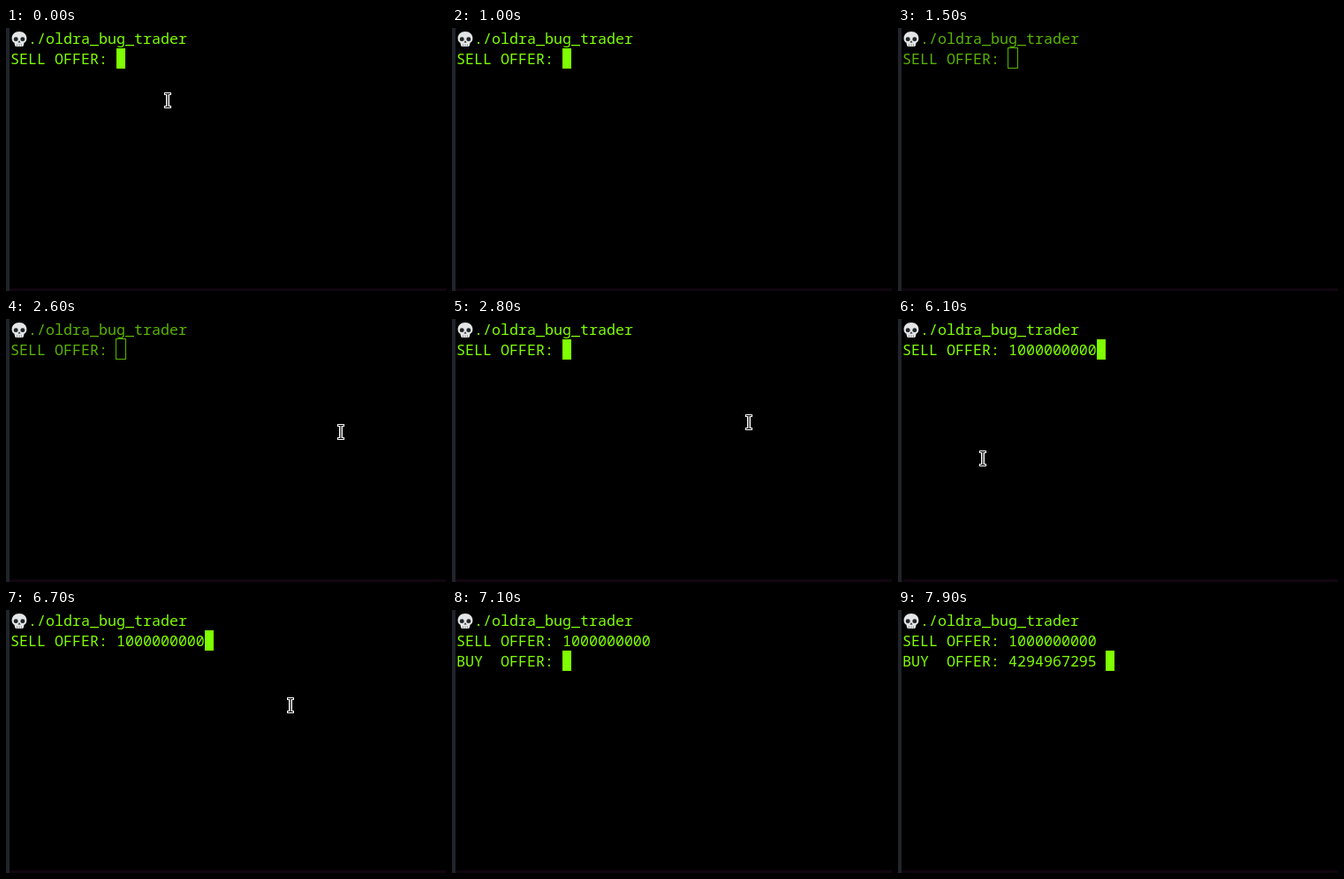
Recreate the animation shown at these times as an HTML page. Size 498 by 298 pixels, loop 8 s.

```html
<!DOCTYPE html>
<html lang="en">
<head>
<meta charset="utf-8">
<title>Terminal</title>
<style>
  html, body { margin: 0; width: 100%; height: 100%; overflow: hidden; background: #000; }
  svg { display: block; }
  text { font: 16.667px "Noto Sans Mono", monospace; white-space: pre; }
  #terminal { color: #7fff00; }
  #terminal.inactive { color: #59b300; }
  #terminal text { fill: currentColor; }
  #caret { fill: currentColor; stroke: none; }
  .inactive #caret { fill: none; stroke: currentColor; }
</style>
</head>
<body>
<svg width="498" height="298" viewBox="0 0 498 298">
  <rect width="498" height="298"/>
  <rect y="295" width="498" height="3" fill="#10060f"/>
  <rect width="4" height="298" fill="#20242b"/>

  <g id="skull">
    <path d="M15 4C10 4 6.600 7.300 6.600 11.700C6.600 14 7.500 15.800 9.500 16.700L10 19.500Q10.300 21 12 21H18Q19.700 21 20 19.500L20.500 16.700C22.500 15.800 23.400 14 23.400 11.700C23.400 7.300 20 4 15 4Z" fill="#e3e5e6"/>
    <g fill="#20262a">
      <ellipse cx="11.200" cy="12.700" rx="2.500" ry="2.400"/>
      <ellipse cx="18.800" cy="12.700" rx="2.500" ry="2.400"/>
      <path d="M15 14.300L16.500 16.600H13.500Z"/>
    </g>
    <path d="M12.500 18.500V20.500M15 18.500V20.500M17.500 18.500V20.500" stroke="#6d7478" stroke-width=".8"/>
  </g>

  <g id="terminal">
    <text x="25" y="18">./oldra_bug_trader</text>
    <text id="sell" x="5" y="41"></text>
    <text id="buy" x="5" y="64"></text>
    <rect id="caret"/>
  </g>

  <g id="pointer">
    <path d="M-4-9H4V-6H2V6H4V9H-4V6H-2V-6H-4Z" fill="#fff"/>
    <path d="M-3-7.500H3M-3 7.500H3M0-7.500V7.500" stroke="#000" stroke-width="1.200"/>
  </g>
</svg>
<script>
const LOOP = 8000, CELL = 10, ROW = 23, LEFT = 5;
const [terminal, sell, buy, caret, pointer] =
  ["terminal", "sell", "buy", "caret", "pointer"].map(id => document.getElementById(id));

// [start ms, x, y]; no position means the pointer is outside the window
const pointerSteps = [
  [0, 183, 82], [800, 423, 140], [1000],
  [2600, 379, 128], [2700, 348, 120], [2800, 336, 117], [3600, 409, 113], [3700],
  [6100, 96, 158], [6200, 15, 163], [6300, 130, 140], [6400, 271, 115],
  [6700, 322, 108], [6800, 325, 107], [7000]
];
const sellSteps = [[0, "SELL OFFER: "], [3300, "SELL OFFER: 1000000000"]];
const buySteps = [[0, ""], [7100, "BUY  OFFER: "], [7900, "BUY  OFFER: 4294967295 "]];

const at = (steps, time) => steps.findLast(([start]) => start <= time).slice(1);

function placeCaret(column, row, hollow) {
  const inset = hollow ? 0.5 : 0;
  const box = {
    x: LEFT + column * CELL - inset, y: row * ROW - inset,
    width: CELL + 2 * inset, height: ROW
  };
  for (const name in box) caret.setAttribute(name, box[name]);
}

function draw(time) {
  const inactive = time >= 1500 && time < 2800;
  const [sellLine] = at(sellSteps, time);
  const [buyLine] = at(buySteps, time);
  const [x, y] = at(pointerSteps, time);

  terminal.classList.toggle("inactive", inactive);
  sell.textContent = sellLine;
  buy.textContent = buyLine;
  placeCaret((buyLine || sellLine).length, buyLine ? 2 : 1, inactive);

  pointer.style.display = x === undefined ? "none" : "";
  if (x !== undefined) pointer.setAttribute("transform", `translate(${x} ${y})`);
}

function frame() {
  draw(performance.now() % LOOP);
  requestAnimationFrame(frame);
}
frame();
</script>
</body>
</html>
```
